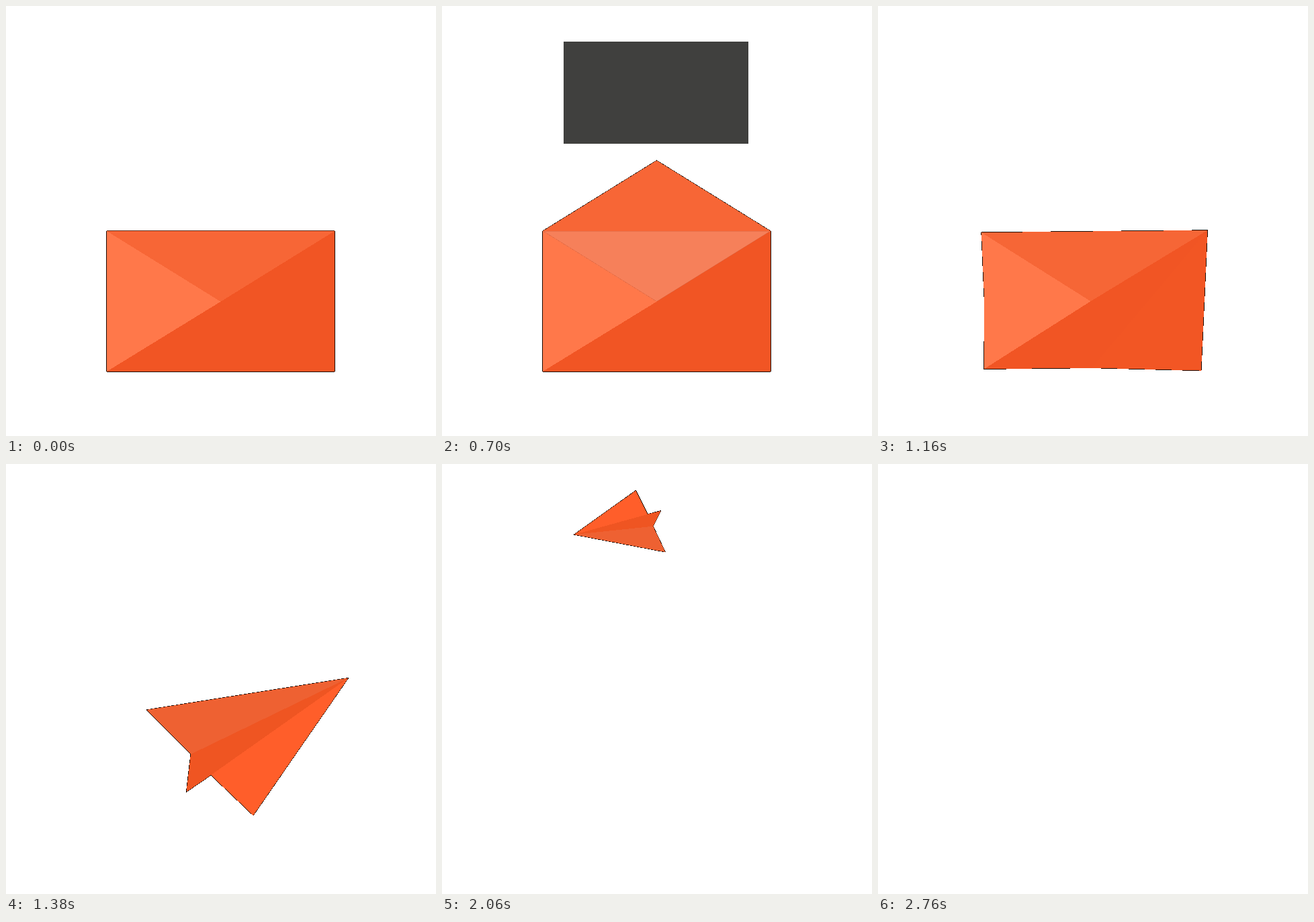
Recreate the animation shown at these times as an HTML page. Size 640 by 640 pixels, loop 3080 ms.

```html
<!DOCTYPE html>
<html lang="en">
<head>
<meta charset="utf-8">
<title>Letter to paper plane</title>
<style>
html, body { margin: 0; width: 100%; height: 100%; overflow: hidden; background: #fff; }
svg { display: block; width: 100vw; height: 100vh; shape-rendering: crispEdges; }
</style>
</head>
<body>
<svg id="stage" viewBox="0 0 640 640"></svg>
<script>
const LOOP = 3080, STEP = 20;
const NS = 'http://www.w3.org/2000/svg';
const stage = document.getElementById('stage');

function add(tag, attrs) {
  const el = document.createElementNS(NS, tag);
  for (const k in attrs) el.setAttribute(k, attrs[k]);
  return stage.appendChild(el);
}
const poly = (fill, extra) => add('polygon', { fill, ...extra });
const card = fill => add('rect', { x: 181, width: 275, height: 152, fill });

// Back to front
const shadow = card('#000');
const outline = poly('#f15524', { stroke: '#1c0d06', 'stroke-width': 1.2, 'stroke-linejoin': 'round' });
const inside = poly('#f6805a', { stroke: '#d2603e', 'stroke-width': 0.8, 'shape-rendering': 'geometricPrecision' });
const flapUp = poly('#f76636');
const letter = card('#fffef5');
const flapDown = poly('#f76636');
const left = poly('#ff784a');
const keel = poly('#f15524');
const wing = poly('#f15524');

// Corner positions: sealed envelope, then folded plane
const corners = {
  tail:  [[150, 335], [209, 366]],
  nose:  [[489, 335], [509.5, 318.5]],
  mid:   [[319.5, 440], [275, 432]],
  side:  [[150, 440], [275, 432]],
  foot:  [[150, 544], [268.5, 488]],
  notch: [[319.5, 544], [305, 463]],
  tip:   [[489, 544], [368, 523]]
};
const ANCHOR = [392, 375];

// time, x, y, heading in degrees, scale
const flight = [
  [1380, 392, 375, 25.6, 1],
  [1700, 501, 284, 41.5, 0.8635],
  [1810, 532, 200, 85, 0.755],
  [1920, 440, 114, 138, 0.625],
  [2060, 255.5, 99, 185.8, 0.4535],
  [2180, 160, 150, 235, 0.32],
  [2300, 152, 236, 295, 0.2],
  [2450, 215, 290, 360, 0.09],
  [2660, 300, 270, 420, 0]
];

const lerp = (a, b, p) => a + (b - a) * p;
function ease(t, from, to) {
  const p = Math.min(1, Math.max(0, (t - from) / (to - from)));
  return 0.5 - 0.5 * Math.cos(Math.PI * p);
}
function mix(a, b, p) {
  return 'rgb(' + a.map((v, i) => Math.round(lerp(v, b[i], p))).join(',') + ')';
}
function setPoints(el, pts) {
  el.setAttribute('points', pts.map(p => p[0].toFixed(2) + ',' + p[1].toFixed(2)).join(' '));
}

// Smooth curve through the flight keys
function flightAt(t) {
  const n = flight.length - 1;
  if (t <= flight[0][0]) return flight[0];
  if (t >= flight[n][0]) return flight[n];
  let i = 0;
  while (t >= flight[i + 1][0]) i++;
  const a = flight[i], b = flight[i + 1], d = b[0] - a[0], u = (t - a[0]) / d;
  const slope = (j, k) => j === 0 || j === n ? 0 :
    (flight[j + 1][k] - flight[j - 1][k]) / (flight[j + 1][0] - flight[j - 1][0]);
  return a.map((v, k) => k === 0 ? t :
    v * (1 + 2 * u) * (1 - u) ** 2 + d * slope(i, k) * u * (1 - u) ** 2 +
    b[k] * u * u * (3 - 2 * u) + d * slope(i + 1, k) * u * u * (u - 1));
}

function placeCorners(t, fold) {
  const [, x, y, heading, scale] = flightAt(t);
  const turn = (heading - flight[0][3]) * Math.PI / 180;
  const c = Math.cos(turn) * scale, s = Math.sin(turn) * scale;
  const out = {};
  for (const k in corners) {
    const [from, to] = corners[k];
    const dx = lerp(from[0], to[0], fold) - ANCHOR[0];
    const dy = lerp(from[1], to[1], fold) - ANCHOR[1];
    out[k] = [x + dx * c + dy * s, y - dx * s + dy * c];
  }
  return out;
}

function drawLetter(t) {
  const show = t > 660 && t < 1085;
  const alpha = Math.min(1, (t - 660) / 160);
  for (const el of [shadow, letter]) {
    el.style.display = show ? '' : 'none';
    el.setAttribute('y', lerp(37, 366.5, ease(t, 660, 940)));
  }
  letter.setAttribute('opacity', Math.max(0, alpha));
  shadow.style.display = show && alpha < 1 ? '' : 'none';
}

function draw(t) {
  stage.style.visibility = t >= 2640 ? 'hidden' : 'visible';
  const fold = ease(t, 1120, 1360);
  const { tail, nose, mid, side, foot, notch, tip } = placeCorners(t, fold);
  const flap = 1 - 2 * (ease(t, 80, 600) - ease(t, 780, 1085));
  const apex = [mid[0], fold > 0 ? mid[1] : 335 + 105 * flap];
  const up = flap < 0;

  drawLetter(t);
  setPoints(outline, [tail, ...(up ? [apex] : []), nose, tip, notch, foot, side]);
  setPoints(inside, [tail, nose, mid]);
  inside.style.display = fold > 0 ? 'none' : '';
  setPoints(flapUp, up ? [tail, nose, apex] : []);
  setPoints(flapDown, up ? [] : [tail, nose, apex]);
  setPoints(left, [tail, mid, foot, side]);
  setPoints(keel, [nose, mid, foot, notch]);
  setPoints(wing, [nose, notch, tip]);

  flapDown.setAttribute('fill', mix([247, 102, 54], [238, 97, 50], fold));
  keel.setAttribute('fill', mix([241, 85, 36], [239, 85, 34], fold));
  wing.setAttribute('fill', mix([241, 85, 36], [255, 94, 42], fold));
}

const start = performance.now();
function tick() {
  const t = (performance.now() - start) % LOOP;
  draw(Math.floor(t / STEP) * STEP);
  requestAnimationFrame(tick);
}
tick();
</script>
</body>
</html>
```
